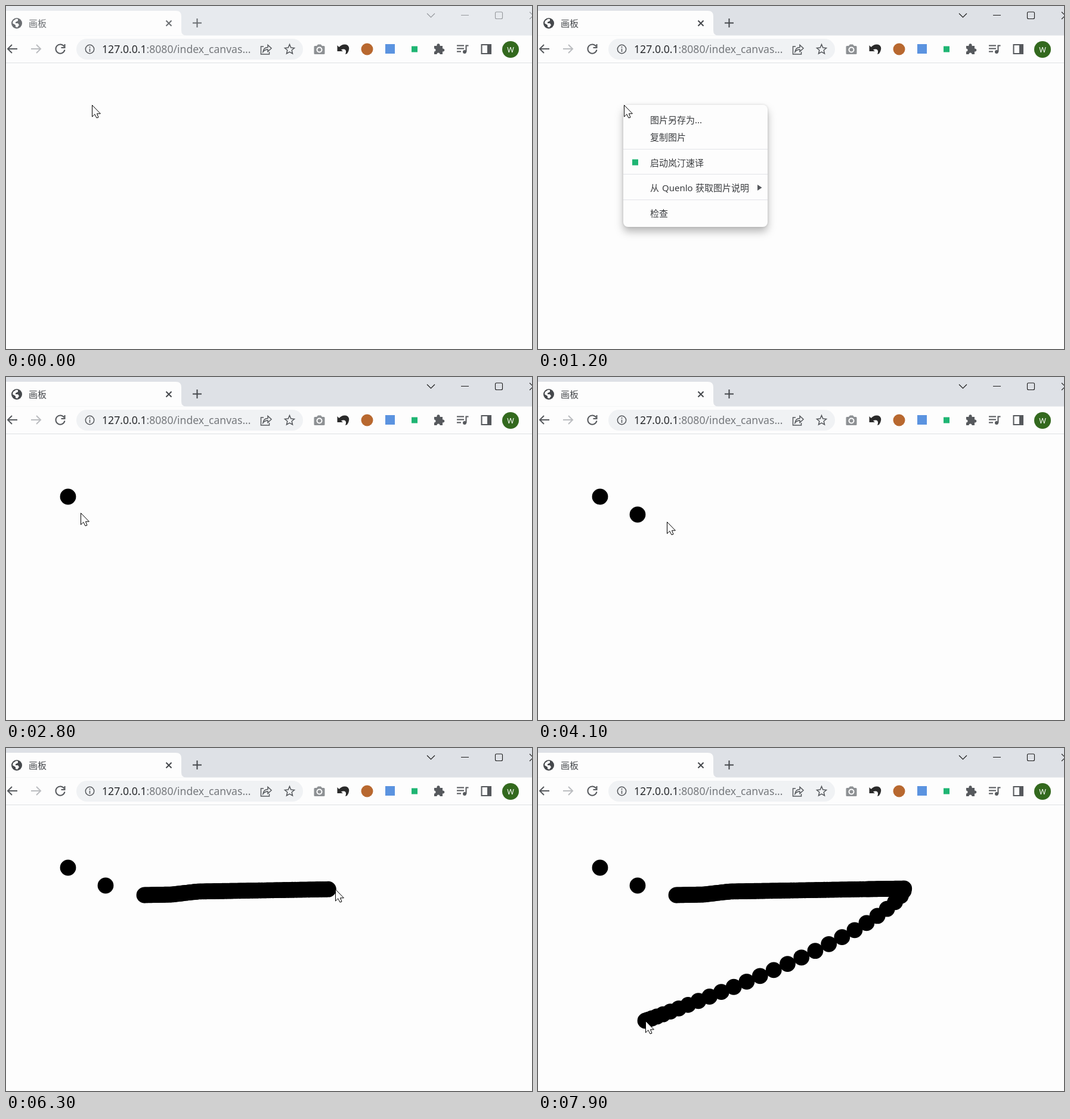
These frames come from a looping animation (882 px wide and 576 px high, 8 s). An HTML page:

```html
<!DOCTYPE html>
<html lang="zh">
<head>
<meta charset="utf-8">
<title>画板</title>
<style>
  html, body { margin: 0; width: 100%; height: 100%; overflow: hidden; background: #fdfdfd; }
  svg { display: block; width: 882px; height: 576px; }
  text { font-family: "Noto Sans", "Open Sans", "Noto Sans CJK SC", "Noto Sans CJK", sans-serif; }
  .page { fill: #fdfdfd; }
  .cjk { font-size: 15px; fill: #3a3c3f; }
  .line { fill: none; stroke: #56595d; stroke-width: 2; }
  .thin { stroke-width: 1.5; }
  .solid { fill: #56595d; }
  #bar { fill: #e7eaee; }
  #controls { fill: none; stroke: #96999d; stroke-width: 1.1; }
  #tab { --ink: #6b6e72; }
  #tab .cjk, #tab .solid { fill: var(--ink); }
  #tab .line { stroke: var(--ink); }
  .active #bar { fill: #dee1e6; }
  .active #controls { stroke: #1c1c1c; }
  .active #tab { --ink: #45484c; }
  #menu { visibility: hidden; }
  .open #menu { visibility: visible; }
  #panel { filter: drop-shadow(0 0 2px #0002) drop-shadow(0 8px 7px #0004); }
</style>
</head>
<body>
<svg id="stage" viewBox="0 0 882 576">
  <rect class="page" width="882" height="576"/>
  <rect id="bar" width="882" height="49.5"/>
  <path class="page" d="M0 8H285Q294 8 294 17V41Q294 49.5 302 49.5H0Z"/>
  <path d="M0 95.5H882" stroke="#dfe1e4"/>

  <g id="tab">
    <circle class="solid" cx="18" cy="29" r="9"/>
    <path class="page" d="M12 25L17 21.5L20 22V25L16 27V29H20L22 32L19 36L16 35V32L11 29Z"/>
    <text class="cjk" x="38" y="34.5">画板</text>
    <path class="line" d="M268.5 24.5L277.5 33.5M277.5 24.5L268.5 33.5"/>
    <path class="line" d="M313 28.5H328M320.5 21V36"/>
  </g>

  <g id="controls">
    <path d="M706 12.5L712.5 19L719 12.5M763 15.500H776M878 10L890 22M878 22L890 10"/>
    <rect x="820.5" y="10" width="12" height="11.5" rx="2"/>
  </g>

  <g class="line">
    <path d="M19 72H3M10 65L3 72L10 79"/>
    <path d="M42 72H58M51 65L58 72L51 79" stroke="#bbbdc0"/>
    <path d="M97.5 68A7.6 7.6 0 1 0 98.5 73.5M98.5 64V70H92.5"/>
  </g>

  <rect x="118" y="55" width="380" height="35" rx="17.5" fill="#f0f2f4"/>
  <g class="line thin">
    <circle cx="140.5" cy="72.5" r="7.2"/>
    <path d="M140.5 68V70M140.5 71.5V77"/>
    <path d="M432 68H427.5V81H441.5V77M431 77Q432 69.5 439 69.5V65.5L445 71L439 76.500V73Q434 73 431 77Z"/>
    <path d="M475.5 64.5L477.8 70L483.5 70.5L479.2 74.3L480.5 80L475.5 77L470.5 80L471.8 74.3L467.5 70.500L473.2 70Z"/>
  </g>
  <text x="161" y="79" font-size="17.6" fill="#75787c"><tspan fill="#26282b">127.0.0.1</tspan>:8080/index_canvas...</text>

  <rect x="516.5" y="67" width="18" height="14" rx="1.5" fill="#8e9194"/>
  <path d="M521 67L523 64.5H528L530 67Z" fill="#8e9194"/>
  <circle class="page" cx="525.5" cy="73.5" r="5"/>
  <circle cx="525.5" cy="73.5" r="3" fill="#8e9194"/>
  <path d="M555.5 76V66L558.5 69Q566 62 573 66Q578 71 572 80L569 81Q572 74 567 72.500Q564 72 562 73.5L565 76Z" fill="#2a2a2a"/>
  <circle cx="605.5" cy="72.5" r="10" fill="#b8682f"/>
  <rect x="636" y="64" width="16" height="16" fill="#5b93e0"/>
  <rect x="680" y="67.5" width="10" height="10" fill="#1fb573"/>
  <path class="solid" d="M718 67H722.5A2.7 2.7 0 1 1 727.5 67H732V71.5A2.6 2.6 0 1 1 732 76.5V81H727.5A2.5 2.5 0 1 0 722.5 81H718V76.5A2.5 2.5 0 1 0 718 71.5Z"/>
  <path class="line" d="M756 66.5H768M756 71.5H768M756 76.5H763M771.5 77V66.5H775.5"/>
  <circle class="solid" cx="769" cy="77" r="3"/>
  <rect class="line" x="797.5" y="65" width="15.5" height="15"/>
  <rect class="solid" x="807" y="65" width="6" height="15"/>
  <circle cx="846" cy="73" r="14" fill="#33691e"/>
  <text x="846" y="77.5" font-size="12.5" text-anchor="middle" fill="#fdfdfd">W</text>

  <g id="ink"></g>

  <g id="menu">
    <rect class="page" id="panel" x="143" y="166" width="242" height="205" rx="8"/>
    <path d="M143 240.5H385M143 282.5H385M143 325.5H385" stroke="#e2e3e8"/>
    <g class="cjk">
      <text x="188" y="196.5">图片另存为...</text>
      <text x="188" y="225.5">复制图片</text>
      <text x="188" y="268.5">启动岚汀速译</text>
      <text y="310.5"><tspan x="188">从</tspan><tspan x="208">Quenlo</tspan><tspan x="264">获取图片说明</tspan></text>
      <text x="188" y="353.5">检查</text>
    </g>
    <rect x="158" y="257.5" width="10" height="10" fill="#1fb573"/>
    <path class="solid" d="M368 300L375.5 305L368 310Z"/>
  </g>

  <path id="cursor" d="M.5 .5V20L4.8 15.8L8 22L11 21L8.5 14.8H14.4Z" fill="#fdfdfd" stroke="#000"/>
</svg>

<script>
const LOOP = 8000, STEP = 100;
const stage = document.getElementById('stage');
const ink = document.getElementById('ink');
const cursor = document.getElementById('cursor');

// Pointer legs: start time, end time, x and y reached
const home = [144, 166];
const legs = [
  [1500, 1800, 104, 201],
  [2700, 2800, 125, 228],
  [2800, 3100, 167, 231],
  [3800, 4200, 232, 247],
  [4900, 5200, 278, 246],
  [5200, 5450, 322, 241],
  [5450, 5700, 378, 240],
  [5700, 6300, 552, 237],
  [6300, 6700, 615, 236],
  [6700, 6800, 621, 238],
  [6800, 7080, 613, 240]
];
const SWEEP_START = 7080, SWEEP_END = 7895, SWEEP_DOTS = 27;

const clamp = v => Math.min(1, Math.max(0, v));
const smooth = k => k * k * (3 - 2 * k);

// Fast stroke back to the lower left, s from 0 to 1
function sweepPoint(s) {
  const p = smooth(s ** 0.85);
  return [613 - 433 * p, 240 + 218 * p ** 0.72];
}
const sweepAt = t => 1 - (1 - clamp((t - SWEEP_START) / (SWEEP_END - SWEEP_START))) ** 2.5;

function pointAt(t) {
  if (t >= SWEEP_START) return sweepPoint(sweepAt(t));
  let [x, y] = home;
  for (const [from, to, toX, toY] of legs) {
    const k = clamp((t - from) / (to - from));
    x += (toX - x) * k;
    y += (toY - y) * k;
  }
  return [x, y];
}

function addDot([x, y], shown) {
  const el = document.createElementNS('http://www.w3.org/2000/svg', 'circle');
  el.setAttribute('cx', x);
  el.setAttribute('cy', y);
  el.setAttribute('r', 13.4);
  ink.append(el);
  dots.push({ el, shown });
}

const dots = [];
for (const time of [2000, 3300]) addDot(pointAt(time), t => t >= time);
// The ink trails the pointer slightly
for (let time = 4900; time <= 6700; time += 16)
  addDot(pointAt(time), t => t >= time + 40);
for (let i = 0; i <= SWEEP_DOTS; i++)
  addDot(sweepPoint(i / SWEEP_DOTS), t => t >= 7000 && sweepAt(t - 5) >= i / SWEEP_DOTS);

function draw(now) {
  const t = Math.floor((now % LOOP) / STEP) * STEP;
  const [x, y] = pointAt(t).map(Math.round);
  cursor.setAttribute('transform', `translate(${x} ${y})`);
  stage.classList.toggle('active', t >= 800);
  stage.classList.toggle('open', t >= 1000 && t < 1900);
  for (const { el, shown } of dots) el.style.display = shown(t) ? '' : 'none';
}

const start = performance.now();
function tick() {
  draw(performance.now() - start);
  requestAnimationFrame(tick);
}
tick();
</script>
</body>
</html>
```
